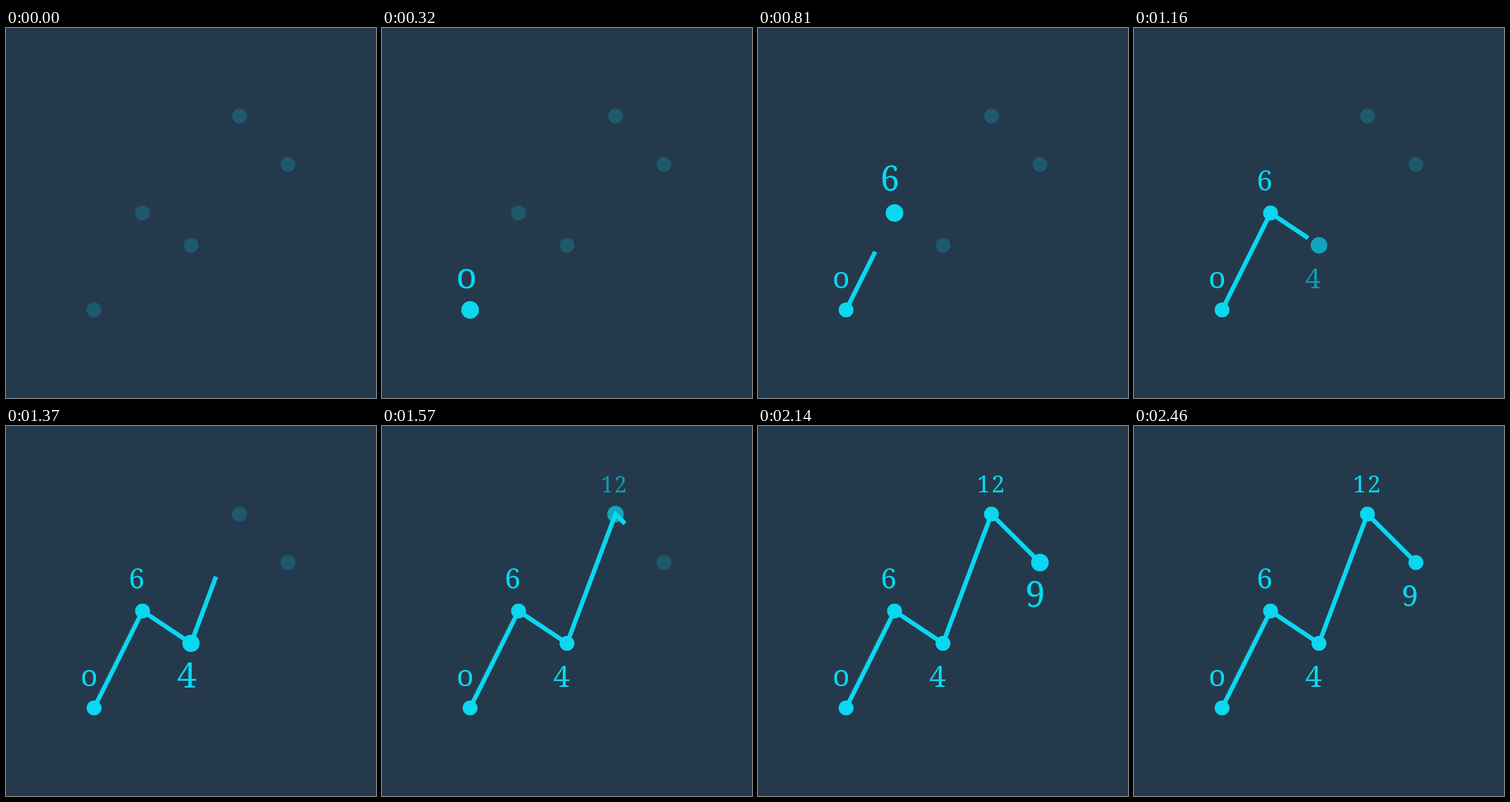
An HTML page with a canvas that plays this animation: 546 px wide and 546 px high, repeating every 2960 ms.

```html
<!DOCTYPE html>
<html lang="en">
<head>
<meta charset="utf-8">
<title>Line chart</title>
<style>
  html, body { margin: 0; height: 100%; overflow: hidden; background: #243a4c; }
  canvas { display: block; }
</style>
</head>
<body>
<canvas id="stage" width="546" height="546"></canvas>
<script>
const ctx = document.getElementById('stage').getContext('2d');
const LOOP = 2960;
const CYAN = '#0ad7f0';

// Each label grows from (left, pivot); drop is how far its digit hangs below that line.
// pop holds the times: start, full size, start of shrinking, settled.
const points = [
  { value: 0, text: 'o', size: 44, left: 110, pivot: 383.5, drop: 0, pop: [70, 310, 390, 580] },
  { value: 6, text: '6', size: 42, left: 181, pivot: 239.5, drop: 0, pop: [410, 600, 850, 1040] },
  { value: 4, text: '4', size: 44, left: 252.5, pivot: 377, drop: 7.5, pop: [1045, 1235, 1350, 1540] },
  { value: 12, text: '12', size: 35, left: 323, pivot: 97.5, drop: 0, pop: [1455, 1645, 1770, 1960] },
  { value: 9, text: '9', size: 44, left: 395, pivot: 258, drop: 7.5, pop: [1900, 2100, 2270, 2460] },
].map((p, i) => ({ ...p, x: 130 + 71.5 * i, y: 416 - p.value * 143 / 6 }));

// Time and drawn length of the line.
const lineKeys = [[560, 0], [810, 96], [1160, 226.5], [1570, 469.4], [1750, 524], [1850, 551]];

const progress = (t, from, to) => Math.min(1, Math.max(0, (t - from) / (to - from)));
const mix = (a, b, k) => a + (b - a) * k;

function lineLength(t) {
  return lineKeys.slice(1).reduce((length, [time, end], i) => {
    const [from, start] = lineKeys[i];
    return length + (end - start) * progress(t, from, time);
  }, 0);
}

function drawPoint(p, t) {
  const grow = progress(t, p.pop[0], p.pop[1]);
  const settle = progress(t, p.pop[2], p.pop[3]);
  ctx.fillStyle = CYAN;
  ctx.globalAlpha = mix(0.2, 1, grow);
  ctx.beginPath();
  ctx.arc(p.x, p.y, 11 + 2 * (grow - settle), 0, 2 * Math.PI);
  ctx.fill();

  if (grow > 0) {
    const scale = mix(0.5, 1.2, grow) - 0.2 * settle;
    ctx.save();
    ctx.globalAlpha = grow;
    ctx.translate(p.left + 2, p.pivot);
    ctx.scale(scale, scale);
    ctx.font = `${p.size}px "Noto Serif", serif`;
    ctx.letterSpacing = p.text.length > 1 ? '2px' : '0px';
    ctx.fillText(p.text, -2, p.drop);
    ctx.restore();
  }
  ctx.globalAlpha = 1;
}

function drawLine(length) {
  if (length <= 0) return;
  ctx.strokeStyle = CYAN;
  ctx.lineWidth = 6.5;
  ctx.beginPath();
  ctx.moveTo(points[0].x, points[0].y);
  for (let i = 1; i < points.length && length > 0; i++) {
    const a = points[i - 1], b = points[i];
    const span = Math.hypot(b.x - a.x, b.y - a.y);
    const k = Math.min(1, length / span);
    ctx.lineTo(mix(a.x, b.x, k), mix(a.y, b.y, k));
    length -= span;
  }
  ctx.stroke();
}

function draw(t) {
  ctx.fillStyle = '#243a4c';
  ctx.fillRect(0, 0, 546, 546);
  points.forEach(p => drawPoint(p, t));
  drawLine(lineLength(t));
}

let begin;
function tick(now) {
  begin ??= now;
  draw((now - begin) % LOOP);
  requestAnimationFrame(tick);
}
draw(0);
requestAnimationFrame(tick);
</script>
</body>
</html>
```
